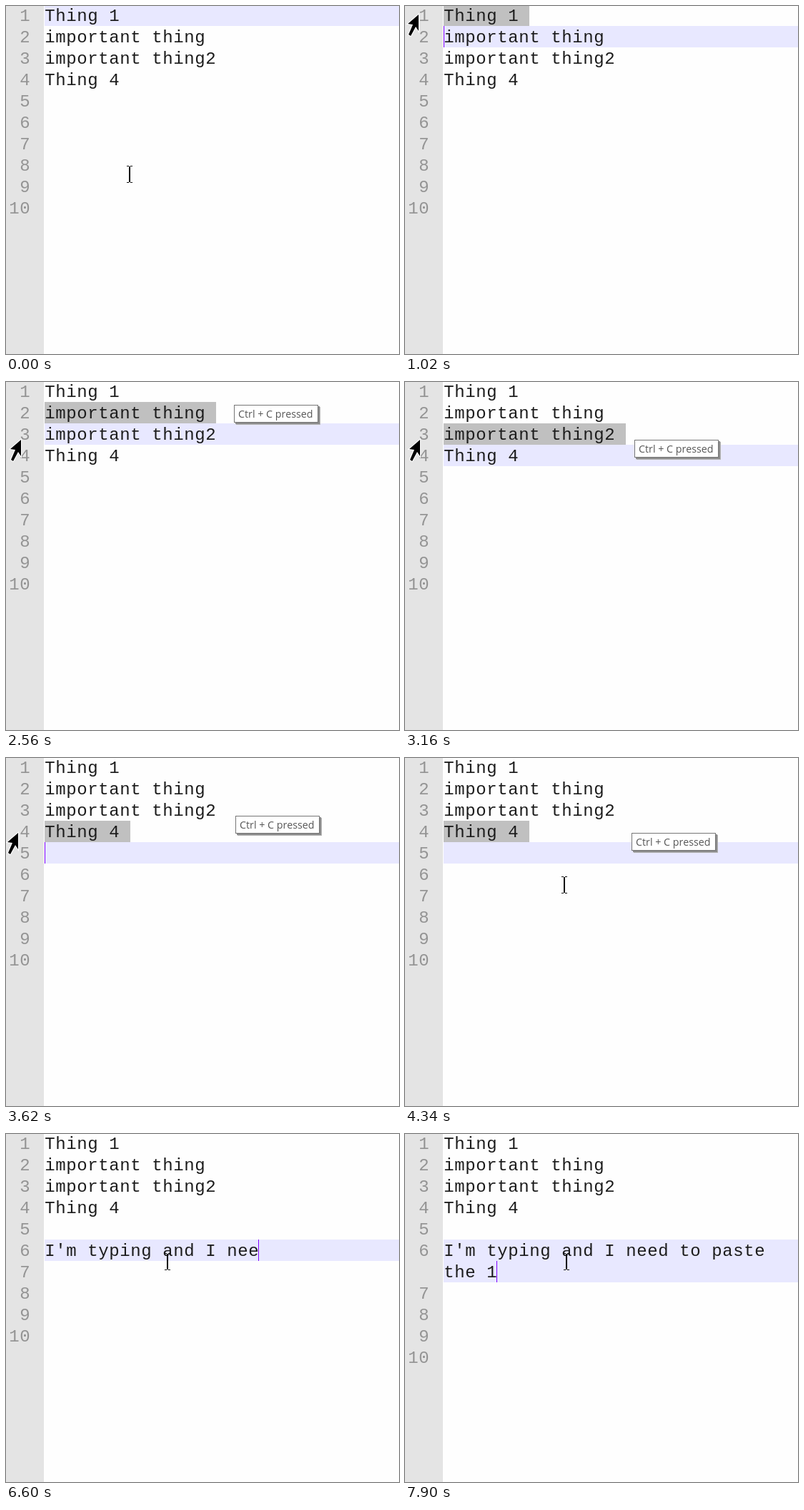
Write an HTML page with a canvas that moves like this. It is 550 px wide and 488 px high and loops after 8 s.

```html
<!DOCTYPE html>
<html lang="en">
<head>
<meta charset="utf-8">
<title>Editor copy demo</title>
<style>
html, body { margin: 0; width: 100%; height: 100%; overflow: hidden; background: #fefefe; }
canvas { display: block; }
</style>
</head>
<body>
<canvas id="stage" width="550" height="488"></canvas>
<script>
const ctx = document.getElementById('stage').getContext('2d');
const LOOP = 8000, TICK = 85, BLINK = 530;
const ROW = 30, CHAR = 15, LEFT = 54, GUTTER = 53, COLS = 32;
const TYPE_START = 4876, KEY_TIME = 84;
const MONO = '24px "Liberation Mono", "Courier New", monospace';
const TIP = '14.3px "Open Sans", "Noto Sans", sans-serif';
const INK = '#1c1c1c';
const lines = ['Thing 1', 'important thing', 'important thing2', 'Thing 4'];
const typed = "I'm typing and I need to paste the 1";

// The pointer rests at each stop in turn and clicks there
const home = { x: 173, y: 236 };
const stops = [
  { x: 19, y: 12 }, { x: 19, y: 32 }, { x: 21, y: 81 }, { x: 17, y: 105 }, { x: 226, y: 179 }
];
const clickTime = i => 970 + 770 * i + 28 * i * i;
const rowTop = row => row * ROW - 2;
const clamp = p => Math.min(1, Math.max(0, p));

function rect(color, x, y, w, h) {
  ctx.fillStyle = color;
  ctx.fillRect(x, y, w, h);
}

function text(str, x, y, color, font, spacing = 0) {
  ctx.font = font;
  ctx.letterSpacing = spacing + 'px';
  ctx.fillStyle = color;
  ctx.fillText(str, x, y);
}

function code(str, x, row, color = INK) {
  text(str, x + 0.3, row * ROW + 21, color, MONO, 0.6);
}

// Each move takes longer the farther it goes and ends shortly before the click
function pointer(t) {
  let { x, y } = home, from = home;
  stops.forEach((to, i) => {
    const time = 120 + 2.2 * Math.hypot(to.x - from.x, to.y - from.y);
    const p = clamp((t - clickTime(i) + 120) / time + 1);
    const ease = p * p * (3 - 2 * p);
    x += (to.x - from.x) * ease;
    y += (to.y - from.y) * ease;
    from = to;
  });
  return [Math.round(x), Math.round(y)];
}

function drawIBeam(x, y) {
  for (const end of [-12, 11]) {
    rect('#000', x - 4, y + end, 3, 1);
    rect('#000', x + 1, y + end, 3, 1);
  }
  rect('#000', x - 1, y - 11, 2, 22);
}

function drawArrow(x, y) {
  const arrow = new Path2D(`M${x} ${y}l-15 13 7 1-6 14 3 2 7-13 4 6z`);
  ctx.strokeStyle = '#fff';
  ctx.lineWidth = 2;
  ctx.stroke(arrow);
  ctx.fillStyle = '#000';
  ctx.fill(arrow);
}

function drawTip(x, y) {
  rect('#b4b4b4', x + 3, y + 3, 118, 25);
  rect('#8c8c8c', x + 2, y + 2, 118, 25);
  rect('#767676', x, y, 118, 25);
  rect('#fff', x + 1, y + 1, 116, 23);
  text('Ctrl + C pressed', x + 6, y + 18, '#575757', TIP);
}

function draw(t) {
  const count = Math.min(typed.length, Math.max(0, Math.floor((t - TYPE_START) / KEY_TIME)));
  const wrapped = count > COLS;
  const split = wrapped ? typed.indexOf('the') : count;
  const last = stops.findLastIndex((_, i) => t >= clickTime(i));
  const current = last + 1;

  rect('#fefefe', 0, 0, 550, 488);
  rect('#e4e4e4', 0, 0, GUTTER, 488);
  rect('#e8e8ff', LEFT, rowTop(current), 496, wrapped ? 2 * ROW : ROW);
  if (last in lines) {
    rect('#c0c0c0', LEFT, rowTop(last), (lines[last].length + 1) * CHAR, ROW);
  }

  for (let i = 0; i < 10; i++) {
    code(String(i + 1).padStart(2), 4, i + (wrapped && i > 5), '#949494');
  }
  lines.forEach((line, i) => code(line, LEFT, i));
  code(typed.slice(0, split), LEFT, 5);
  code(typed.slice(split, count), LEFT, 6);

  if (last >= 0 && (count || (t - clickTime(last)) % (2 * BLINK) < BLINK)) {
    const col = wrapped ? count - split : count;
    rect('#8000ff', LEFT + col * CHAR - (col > 0), rowTop(current + wrapped), 1, ROW);
  }

  lines.forEach((_, i) => {
    const age = t - clickTime(i) - 430;
    if (age >= 0 && age < 740) drawTip(stops[i].x + 300, stops[i].y);
  });
  const [x, y] = pointer(t - t % TICK);
  (x < GUTTER ? drawArrow : drawIBeam)(x, y);
}

const start = performance.now();
function frame() {
  draw((performance.now() - start) % LOOP);
  requestAnimationFrame(frame);
}
frame();
</script>
</body>
</html>
```
